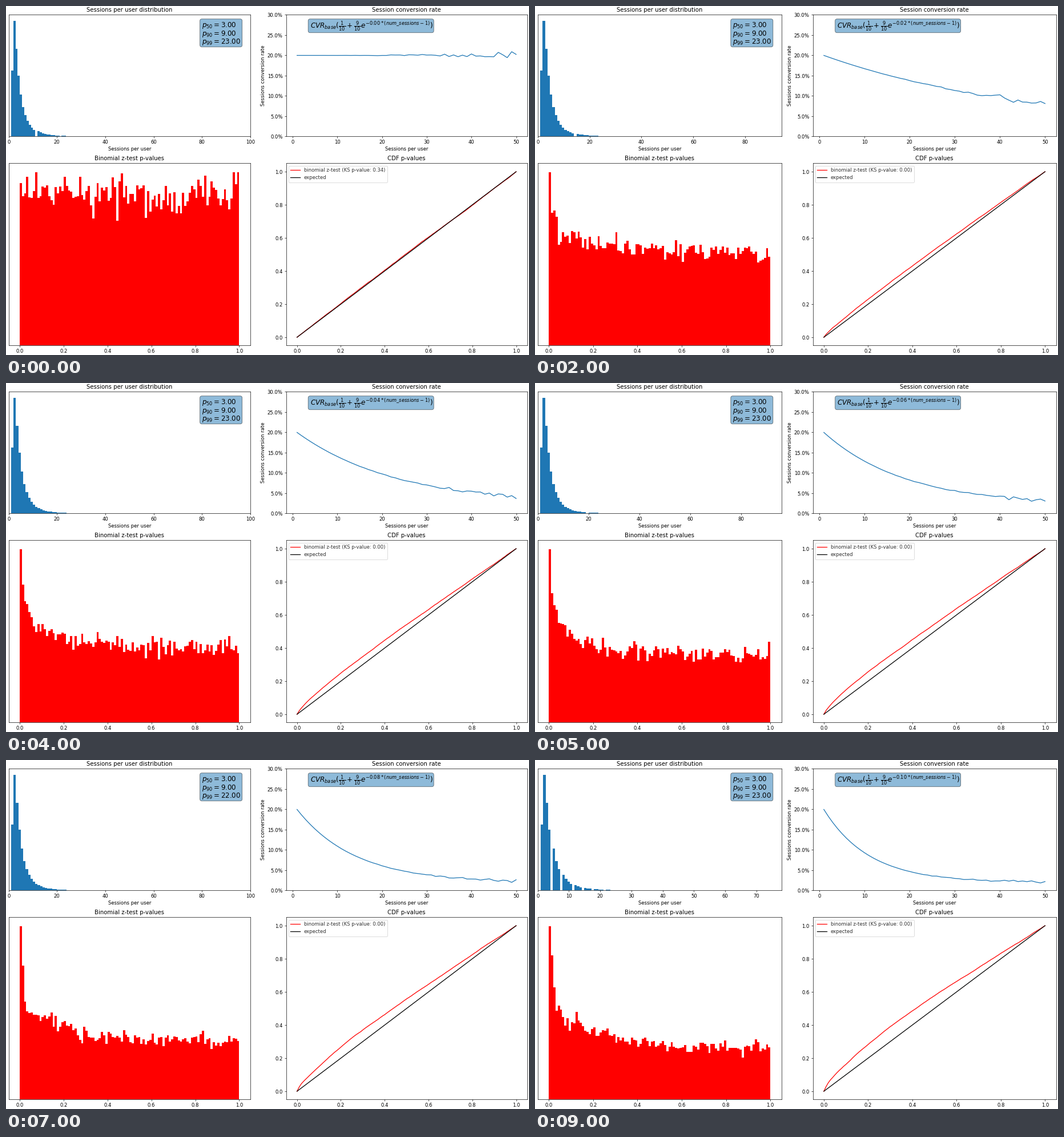
A matplotlib script for the animation above (10000 ms loop, 916 by 611 pixels).

```python
import math

import numpy as np
import matplotlib.pyplot as plt
from matplotlib.animation import FuncAnimation
from matplotlib.patches import FancyBboxPatch
from matplotlib.ticker import MultipleLocator, PercentFormatter

W, H, DPI = 916, 611, 61.0625
FRAMES, STEP_MS = 10, 1000
BLUE = "#1f77b4"
TOP_ROW, LOW_ROW = (15.5, 228.5), (275.5, 594.5)

# Most sessions of any user in each run; 101 or more is cut at 100
MAX_SESSIONS = [92, 92, 94, 101, 101, 96, 98, 101, 101, 78]
NARROW = {2, 5, 6, 9}

plt.rcParams["font.family"] = "DejaVu Sans"
plt.rcParams["axes.labelpad"] = 3
fig = plt.figure(figsize=((W + 1e-6) / DPI, (H + 1e-6) / DPI), dpi=DPI)


def panel(cols, rows, title):
    (left, right), (top, bottom) = cols, rows
    ax = fig.add_axes([left / W, 1 - bottom / H,
                       (right - left) / W, (bottom - top) / H])
    ax.set_title(title)
    return ax


def note(x, lines, baseline, width, height):
    """Rounded box with text lines; x and baseline in pixels from top left."""
    box = FancyBboxPatch((x, H - 26.2 - height), width, height,
                         boxstyle="round,pad=3.5", facecolor=BLUE,
                         edgecolor="black", alpha=0.5, transform=None)
    fig.add_artist(box)
    for k, line in enumerate(lines):
        fig.text(x / W, 1 - (baseline + 14.5 * k) / H, line, fontsize=14,
                 va="baseline")


def session_bars(top):
    """Rounded-up log-normal sessions, put into 100 equal bins."""
    cdf = [0] + [0.5 + 0.5 * math.erf((math.log(k) - 1) / 0.9 / math.sqrt(2))
                 for k in range(1, top + 1)]
    width = (top - 1) / 100
    slot = np.floor(np.arange(top) / width + 1e-9)
    return 1 + slot * width, np.diff(cdf), width


def conversion(decay, rng):
    """Decaying rate; the noise grows as users with many sessions get rare."""
    n = np.arange(1, 51)
    rate = 0.2 * (0.1 + 0.9 * np.exp(-decay * (n - 1)))
    spread = 0.007 * (n / 50) ** 3 * np.sqrt(rate / 0.2)
    return n, rate + spread * rng.normal(size=50)


def p_values(t, rng):
    """Noisy density of 100 bins that piles up at zero as t goes to 1."""
    x = np.arange(100) / 100
    density = (1 + (0.08 + 0.85 * t) * np.exp(-x / 0.16)
               + 1.4 * t ** 0.6 * np.exp(-x / 0.013))
    noise = 0.07 * rng.normal(size=100)
    noise[0] = 0
    heights = density * (1 + noise)
    return heights / heights.max()


def draw_sessions(i, cols):
    ax = panel(cols, TOP_ROW, "Sessions per user distribution")
    top = MAX_SESSIONS[i]
    x, heights, width = session_bars(top)
    ax.bar(x, heights, width, align="edge", color=BLUE)
    ax.set_xlim(0, top if i in NARROW else 100)
    ax.set_ylim(0, heights.max() * 1.05)
    ax.xaxis.set_major_locator(MultipleLocator(10 if top < 80 else 20))
    ax.set_yticks([])
    ax.set_xlabel("Sessions per user")
    p99 = 22 if i == 7 else 23
    lines = ["$p_{%d}=%.2f$" % row for row in ((50, 3), (90, 9), (99, p99))]
    note(cols[0] + 0.8 * (cols[1] - cols[0]), lines, 37, 67, 42)


def draw_conversion(decay, rng, cols):
    ax = panel(cols, TOP_ROW, "Session conversion rate")
    ax.plot(*conversion(decay, rng), color=BLUE)
    ax.set_ylim(0, 0.3)
    ax.yaxis.set_major_locator(MultipleLocator(0.05))
    ax.yaxis.set_major_formatter(PercentFormatter(1, decimals=1))
    ax.set_xlabel("Sessions per user")
    ax.set_ylabel("Sessions conversion rate")
    formula = (r"$CVR_{base}(\frac{1}{10} + \frac{9}{10}"
               r"e^{-%.2f*(num\_sessions-1)})$" % decay)
    note(cols[0] + 0.1 * (cols[1] - cols[0]), [formula], 38.5, 213, 17)


def draw_histogram(heights, cols):
    ax = panel(cols, LOW_ROW, "Binomial z-test p-values")
    ax.bar(np.arange(100) / 100, heights, 0.01, align="edge", color="red")
    ax.set_xlim(-0.05, 1.05)
    ax.set_ylim(0, 1.05)
    ax.set_yticks([])


def draw_cdf(heights, ks, cols):
    ax = panel(cols, LOW_ROW, "CDF p-values")
    cdf = np.append(0, np.cumsum(heights)) / heights.sum()
    ax.plot(np.linspace(0, 1, 101), cdf, color="red",
            label="binomial z-test (KS p-value: %.2f)" % ks)
    ax.plot([0, 1], [0, 1], color="black", label="expected")
    ax.set_xlim(-0.05, 1.05)
    ax.set_ylim(-0.05, 1.05)
    ax.legend(loc="upper left", labelcolor="#333333")


def update(i):
    fig.clear()
    rng = np.random.default_rng(40 + i)
    t = i / (FRAMES - 1)
    shift = 4 if i in NARROW else 0
    left, right = (4.7, 427.7 + shift), (490.5 - shift, 912.7)
    heights = p_values(t, rng)
    draw_sessions(i, left)
    draw_conversion(0.1 * t, rng, right)
    draw_histogram(heights, left)
    draw_cdf(heights, 0.34 if i == 0 else 0, right)
    return []


anim = FuncAnimation(fig, update, frames=FRAMES, interval=STEP_MS,
                     init_func=lambda: [], repeat=True, repeat_delay=0)
plt.show()
```
